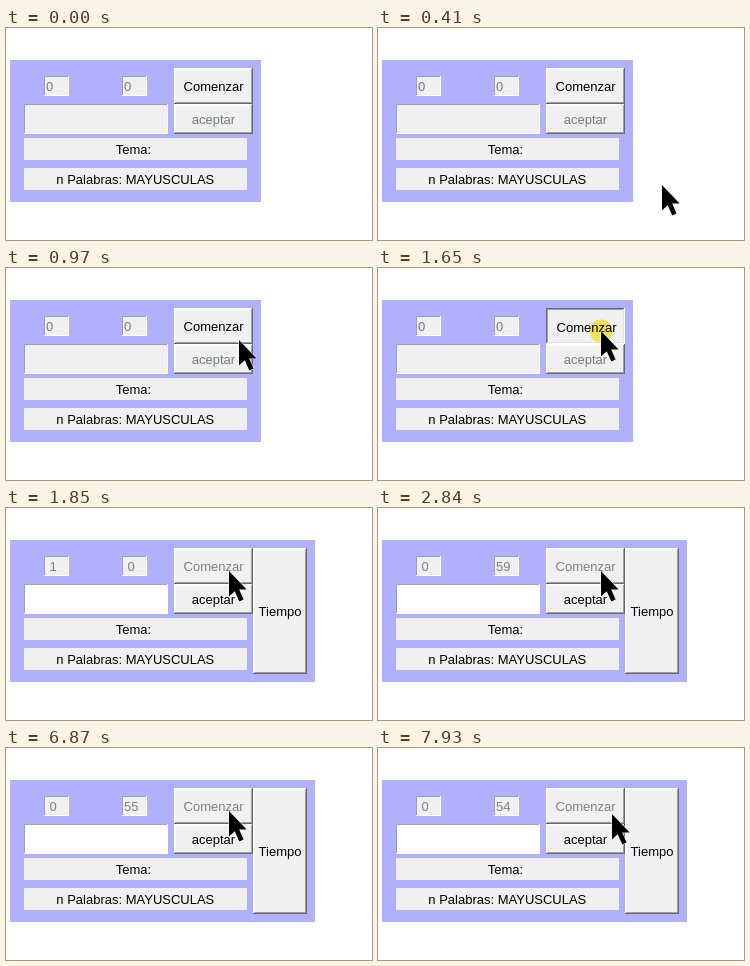
Write an HTML page with a canvas that moves like this. It is 366x212 px and loops after 8000 ms.

```html
<!DOCTYPE html>
<html lang="es">
<head>
<meta charset="utf-8">
<style>
  html, body { margin: 0; width: 100%; height: 100%; overflow: hidden; background: #fff; }
  canvas { display: block; }
</style>
</head>
<body>
<canvas id="stage" width="366" height="212"></canvas>
<script>
const ctx = document.getElementById('stage').getContext('2d');
const LOOP = 8000, STEP = 70, PRESS = 1650, START = 1850;
const FACE = '#f0f0f0', BLACK = '#000', GREY = '#808080', DIM = '#708070';
const TICKS = [2840, 3830, 4890, 5880, 6870, 7790];
const arrow = new Path2D('M0 0V25.5L5.7 20.2L10.3 30.5L14.6 28.6L10.2 18.4H17.6Z');

function rect(x, y, w, h, color) {
  ctx.fillStyle = color;
  ctx.fillRect(x, y, w, h);
}

function text(str, x, y, color = BLACK, align = 'center') {
  ctx.fillStyle = color;
  ctx.textAlign = align;
  ctx.fillText(str, x, y);
}

// One-pixel frame: light and dark sides.
function edge(x, y, w, h, topLeft, bottomRight) {
  rect(x, y, w, 1, topLeft);
  rect(x, y, 1, h, topLeft);
  rect(x, y + h - 1, w, 1, bottomRight);
  rect(x + w - 1, y, 1, h, bottomRight);
}

function button(label, x, y, w, h, color, pressed) {
  const shift = pressed ? 1 : 0;
  rect(x, y, w, h, FACE);
  if (pressed) {
    edge(x, y, w, h, '#696969', '#fff');
    edge(x + 1, y + 1, w - 2, h - 2, '#a0a0a0', '#e3e3e3');
  } else {
    edge(x, y, w, h, '#fff', '#696969');
    edge(x + 1, y + 1, w - 2, h - 2, '#f8f8f8', '#a0a0a0');
  }
  text(label, x + w / 2 + shift, y + h / 2 + 5 + shift, color);
}

function field(x, y, w, h, fill) {
  rect(x, y, w, h, fill);
  edge(x, y, w, h, '#a0a0a0', '#fff');
}

function counter(x, value, color) {
  field(x, 48, 25, 20, FACE);
  text(value, x + 2, 63, color, 'left');
}

function label(str, y) {
  rect(18, y, 223, 22, FACE);
  text(str, 129.3, y + 16);
}

function pointer(t) {
  if (t < 270) return null;
  if (t < 1110) {
    const u = Math.floor((t - 270) / STEP) / 11;
    return [297 - 70 * u, 71 + 129 * (1 - u) ** 2];
  }
  if (t < PRESS) {
    const u = Math.min(3, Math.floor((t - 1040) / STEP)) / 3;
    return [227 - 4 * u, 71 - 8 * u];
  }
  const u = t < 7790 ? 0 : Math.min(3, Math.floor((t - 7720) / STEP)) / 3;
  return [223 + 11 * u, 63 + 3 * u];
}

function draw(t) {
  const running = t >= START;
  const pressed = t >= PRESS && !running;
  const ticks = TICKS.filter(at => t >= at).length;

  rect(0, 0, 366, 212, '#fff');
  ctx.font = '13px "Liberation Sans", Arial, sans-serif';
  rect(4, 32, running ? 305 : 251, 142, '#b0b0ff');

  const color = running ? GREY : DIM;
  const pad = n => String(n).padStart(2);
  counter(38, running ? pad(ticks ? 0 : 1) : '0', color);
  counter(116, running ? pad(ticks ? 60 - ticks : 0) : '0', color);

  field(18, 76, 144, 30, running ? '#fff' : FACE);
  button('Comenzar', 168, 40, 79, 36, running ? GREY : BLACK, pressed);
  button('aceptar', 168, 76, 79, 30, running ? BLACK : DIM);
  if (running) button('Tiempo', 247, 40, 54, 126, BLACK);
  label('Tema: ', 110);
  label('n Palabras: MAYUSCULAS', 140);

  if (pressed) {
    ctx.globalCompositeOperation = 'multiply';
    ctx.fillStyle = '#fff25a';
    ctx.beginPath();
    ctx.arc(223, 63, 11.5, 0, 2 * Math.PI);
    ctx.fill();
    ctx.globalCompositeOperation = 'source-over';
  }

  const tip = pointer(t);
  if (tip) {
    ctx.save();
    ctx.translate(Math.round(tip[0]), Math.round(tip[1]));
    ctx.strokeStyle = '#fff';
    ctx.lineWidth = 1;
    ctx.stroke(arrow);
    ctx.fillStyle = BLACK;
    ctx.fill(arrow);
    ctx.restore();
  }
}

const began = performance.now();
function frame() {
  draw((performance.now() - began) % LOOP);
  requestAnimationFrame(frame);
}
frame();
</script>
</body>
</html>
```
